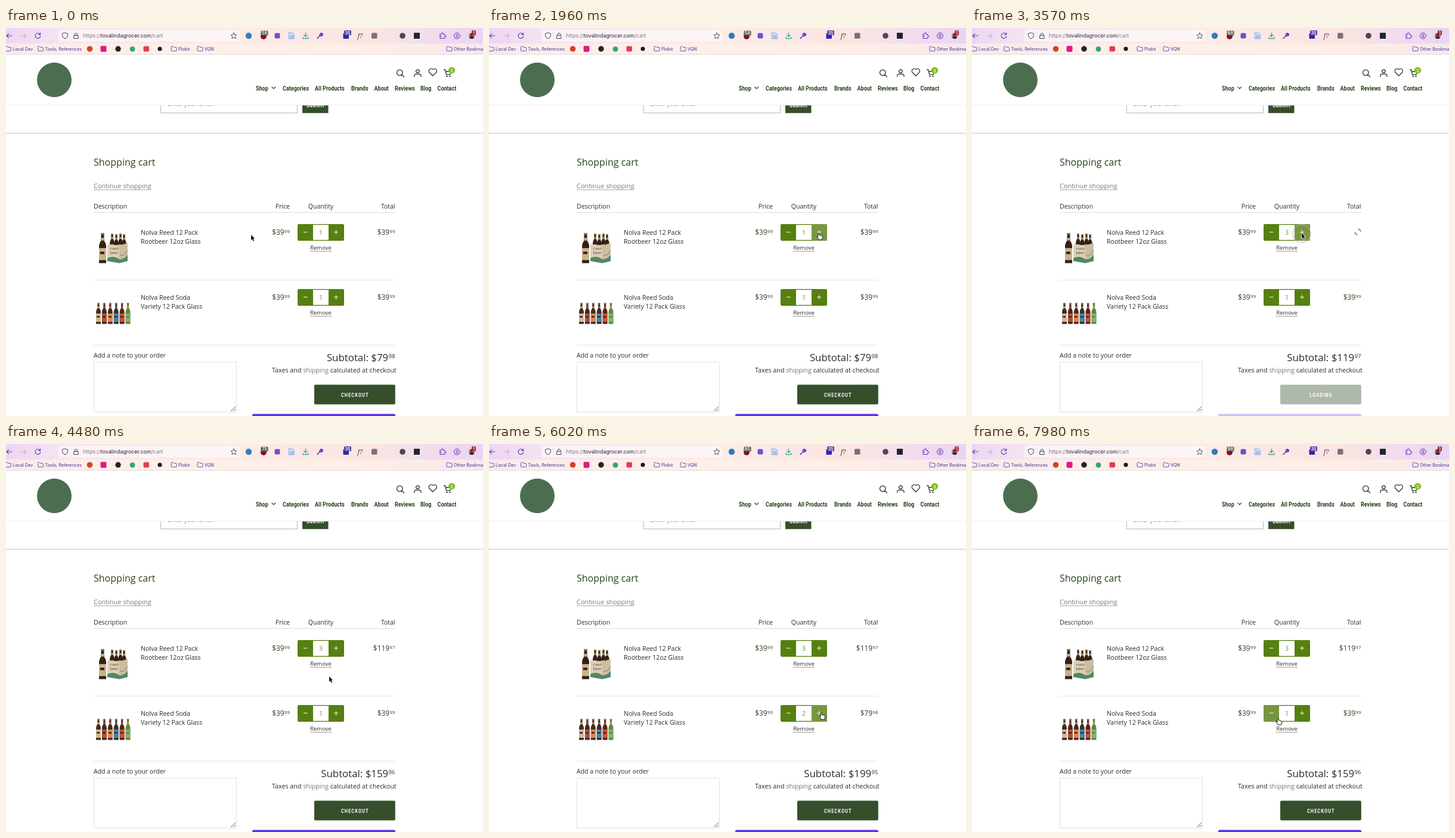
An HTML page with a canvas that plays this animation: 800x651 px, repeating every 8000 ms.

```html
<!DOCTYPE html>
<html lang="en">
<head>
<meta charset="utf-8">
<title>Shopping cart</title>
<style>
html, body { margin: 0; width: 100%; height: 100%; overflow: hidden; background: #fff; }
canvas { display: block; width: 100%; height: 100%; }
</style>
</head>
<body>
<canvas id="stage" width="800" height="651"></canvas>
<script>
const ctx = document.getElementById('stage').getContext('2d');
const LOOP = 8000, STEP = 70, UNIT_PRICE = 3999;
const SANS = '"Open Sans", sans-serif', UI = 'Inter, sans-serif', NARROW = 'Roboto, sans-serif';
const INK = '#2b2b2b', DARK = '#27431f', BUTTON = '#354f2c', GREEN = '#568010', HOVER = '#77973f';
const PURPLE = '#5b35c4';

// row, change in quantity, press, totals refreshed, checkout ready again
const clicks = [
  { row: 0, add: 1, start: 2030, shown: 2730, done: 2940 },
  { row: 0, add: 1, start: 3290, shown: 3990, done: 4200 },
  { row: 1, add: 1, start: 5110, shown: 5740, done: 5950 },
  { row: 1, add: -1, start: 7070, shown: 7630, done: 7770 }
];
const pointerKeys = [
  [0, 411, 347], [280, 411, 347], [1190, 548, 343], [1470, 548, 343], [2030, 553, 344],
  [4130, 553, 344], [4480, 542, 390], [4900, 557, 451], [6160, 557, 451],
  [6930, 502, 455], [7280, 502, 455], [7910, 513, 460], [8000, 513, 460]
];
const badgeKeys = [
  [0, 58], [2100, 58], [2870, 62], [3150, 66], [3360, 66], [4270, 75],
  [5110, 75], [5950, 85], [7070, 85], [7210, 90], [7840, 98], [8000, 98]
];

function track(keys, t, ease) {
  const i = Math.max(1, keys.findIndex(k => k[0] > t));
  const a = keys[i - 1], b = keys[i];
  const p = ease((t - a[0]) / (b[0] - a[0]));
  return a.slice(1).map((v, n) => v + (b[n + 1] - v) * p);
}
const linear = p => p;
const smooth = p => p * p * (3 - 2 * p);

function rect(x, y, w, h, fill, r = 0) {
  ctx.fillStyle = fill;
  ctx.beginPath();
  ctx.roundRect(x, y, w, h, r);
  ctx.fill();
}
function circle(x, y, r, fill) {
  ctx.fillStyle = fill;
  ctx.beginPath();
  ctx.arc(x, y, r, 0, Math.PI * 2);
  ctx.fill();
}
function line(x1, y1, x2, y2, color, width = 1, dash = []) {
  ctx.strokeStyle = color;
  ctx.lineWidth = width;
  ctx.setLineDash(dash);
  ctx.beginPath();
  ctx.moveTo(x1, y1);
  ctx.lineTo(x2, y2);
  ctx.stroke();
  ctx.setLineDash([]);
}
function icon(d, x, y, stroke, width = 1, fill) {
  const path = new Path2D(d);
  ctx.save();
  ctx.translate(x, y);
  ctx.lineJoin = ctx.lineCap = 'round';
  if (fill) { ctx.fillStyle = fill; ctx.fill(path); }
  if (stroke) { ctx.strokeStyle = stroke; ctx.lineWidth = width; ctx.stroke(path); }
  ctx.restore();
}
function text(s, x, y, size, color = INK, align = 'left', family = SANS, style = '400') {
  ctx.font = `${style} ${size}px ${family}`;
  ctx.fillStyle = color;
  ctx.textAlign = align;
  ctx.fillText(s, x, y);
  return ctx.measureText(s).width;
}
// condensed face for navigation and buttons
function narrow(s, x, y, size, color, align = 'left', spacing = 0) {
  ctx.save();
  ctx.translate(x, y);
  ctx.scale(0.82, 1);
  ctx.letterSpacing = spacing + 'px';
  text(s, 0, 0, size, color, align, NARROW, '700');
  ctx.restore();
}
function money(cents, right, y, size, small, color, prefix = '') {
  const w = text(String(cents % 100).padStart(2, '0'), right, y - size * 0.28, small, color, 'right');
  text(prefix + '$' + Math.floor(cents / 100), right - w - 0.3, y, size, color, 'right');
}

function folder(x, label) {
  icon('M0 1.2Q0 0 1 0H3.3L4.6 1.4H8Q9 1.4 9 2.4V6.6Q9 7.6 8 7.6H1Q0 7.6 0 6.6Z', x, 31, PURPLE, 0.9);
  text(label, x + 12, 38, 7.3, '#46309c', 'left', UI);
}
function countBadge(x, y, label, color) {
  rect(x - 6, y - 4, 12, 8, color, 1.5);
  text(label, x, y + 2.8, 7.4, '#fff', 'center', UI, '600');
}

function browserBar(count) {
  const g = ctx.createLinearGradient(0, 0, 800, 0);
  [[0, '#ecd6f3'], [0.12, '#f6e4ef'], [0.5, '#fcebe6'], [0.78, '#fbe4e3'], [1, '#e9d4f5']]
    .forEach(([p, c]) => g.addColorStop(p, c));
  rect(0, 0, 800, 45, g);
  rect(0, 26, 800, 19, 'rgba(255,243,232,.65)');
  rect(88, 3, 304, 20, 'rgba(255,255,255,.5)', 3);
  line(0, 44.5, 800, 44.5, '#e9dcdc');

  icon('M9 4H0M3.6 .4L0 4L3.6 7.6', 1, 9, '#5a38b4', 1.1);
  icon('M0 4H9M5.4 .4L9 4L5.4 7.6', 25, 9, '#c3abd6', 1.1);
  icon('M8 1.8A4.4 4.4 0 1 0 8.8 5.4M8.6 -.4V2.6H5.6', 49, 8.5, '#5a38b4', 1.1);
  icon('M4.5 0L9 1.6V4.6Q8.6 8.4 4.5 10Q.4 8.4 0 4.6V1.6Z', 94.5, 8, '#444', 1);
  icon('M0 4H7V9H0ZM1.4 4V2.2A2.1 2.1 0 0 1 5.6 2.2V4', 114, 8.5, '#444', 1);
  let x = 129;
  [['https://', '#81777f'], ['tovalindagrocer.com', '#29252b'], ['/cart', '#81777f']]
    .forEach(([s, c]) => { x += text(s, x, 16.3, 8.8, c, 'left', UI); });
  icon('M5 0L6.5 3.3L10 3.7L7.4 6.1L8.1 9.6L5 7.8L1.9 9.6L2.6 6.1L0 3.7L3.5 3.3Z', 377, 8, '#444', 0.9);

  circle(407, 13, 5.2, '#2f7cc4');
  circle(432, 14, 5, '#7d1420');
  countBadge(433.5, 8.5, count, '#555');
  rect(450.5, 8.5, 9, 9, '#6853cf', 2);
  icon('M0 0H6L9 3V10H0ZM2 4.5H7M2 6.5H7M2 8.3H7', 474.5, 8, '#6ba0dd', 0.9, '#cfe3f8');
  icon('M4.5 0V6.4M1.6 3.7L4.5 6.6L7.4 3.7M0 7.4V9.6H9V7.4', 498, 8, '#27a28c', 1.2);
  icon('M0 9L5 4M4.6 4.4A2.8 2.8 0 0 1 8 .5L6.5 2.2L7.5 3.2L9.2 1.8A2.8 2.8 0 0 1 5.2 4.6', 522, 8.5, '#4b38cf', 1.7);
  rect(565.5, 9, 9.5, 9, '#3b20ad', 1);
  countBadge(573, 8, '35', '#4f3fa5');
  text('f?', 594, 16.5, 10.5, '#444', 'center', '"Noto Serif", serif', 'italic 400');
  rect(613, 8.2, 9.5, 9.5, '#77727a', 1.5);
  circle(665, 13, 4.8, '#4b474c');
  rect(684, 8, 10, 10, '#1d2733');
  icon('M0 3H2.6Q1.8 0 3.8 0Q5.8 0 5 3H7.6V5.4Q10 4.7 10 6.5Q10 8.2 7.6 7.5V10H0V7.3Q2.2 7.6 2.2 6.5Q2.2 5.2 0 5.7Z', 728, 7.5, PURPLE, 1);
  icon('M10 5A5 5 0 1 1 0 5A5 5 0 1 1 10 5M6.7 4A1.7 1.7 0 1 1 3.3 4A1.7 1.7 0 1 1 6.7 4M2 8.4Q5 5.4 8 8.4', 751.5, 8, PURPLE, 1);
  circle(781, 13, 5.2, '#b48172');
  circle(781, 11.5, 2.2, '#35272b');
  rect(777.5, 14, 7, 4, '#35272b', 2);
  rect(781, 4, 7, 8, '#a3282e', 1.5);
  text('1', 784.5, 10.6, 7, '#fff', 'center', UI, '600');

  folder(-1, 'Local Dev');
  folder(53.5, 'Tools, References');
  circle(140.5, 35, 4.8, '#d8402d');
  rect(158.5, 30, 10, 10, '#e41a86', 2);
  circle(188, 35, 4.7, '#242124');
  circle(212, 35.3, 4.4, '#33a17f');
  rect(230.5, 30.5, 9.5, 9, '#e63c50', 2);
  circle(258, 35, 3.6, '#1d1a1c');
  folder(277, 'Plobit');
  folder(321, 'VQN');
  folder(739, 'Other Bookmarks');
}

function siteHeader() {
  rect(0, 45, 800, 84, '#fff');
  line(0, 129.5, 800, 129.5, '#ececec');
  circle(81, 87, 29, '#4d6d50');

  icon('M9.6 4.9A4.8 4.8 0 1 1 0 4.9A4.8 4.8 0 1 1 9.6 4.9M8.4 8.4L12 12', 655.5, 70, '#26331f', 1.3);
  icon('M8.4 3A2.8 2.8 0 1 1 2.8 3A2.8 2.8 0 1 1 8.4 3M0 12V10.6Q0 7.8 3 7.8H8.2Q11.2 7.8 11.2 10.6V12', 684.8, 69.6, '#26331f', 1.3);
  icon('M7 12.4L1.3 6.7A3.7 3.7 0 0 1 7 1.9A3.7 3.7 0 0 1 12.7 6.7Z', 708.8, 67.8, '#26331f', 1.3);
  icon('M0 0H2.2L4 8.2H10.6L12 3H2.8', 734.5, 70, '#26331f', 1.3);
  circle(739.5, 81, 1.2, '#26331f');
  circle(744.5, 81, 1.2, '#26331f');
  circle(747.5, 71, 5.6, '#84bd2c');
  text('2', 747.5, 73.6, 7.2, '#fff', 'center', SANS, '600');

  [['Shop', 419], ['Categories', 464], ['All Products', 518], ['Brands', 579], ['About', 617.5],
   ['Reviews', 652], ['Blog', 695], ['Contact', 723.5]]
    .forEach(([s, x]) => narrow(s, x, 104.6, 11, DARK));
  icon('M0 0L2.8 2.8L5.6 0', 446, 99, DARK, 1.2);
}

function signup() {
  ctx.strokeStyle = '#b5b5b5';
  ctx.lineWidth = 1;
  ctx.strokeRect(259.5, 110.5, 229, 32);
  text('Enter your email', 271, 131.2, 10, '#888');
  rect(497, 110, 43.5, 32.8, BUTTON);
  narrow('Submit', 519, 132.8, 10, '#fff', 'center', 0.8);
  line(0, 176.5, 800, 176.5, '#c2c2c2');
}

function bottle(x, y, w, h, glass, label, cap) {
  const c = x + w / 2, n = w * 0.19;
  ctx.fillStyle = glass;
  ctx.beginPath();
  ctx.moveTo(c - n, y);
  ctx.lineTo(c + n, y);
  ctx.lineTo(c + n * 1.2, y + h * 0.26);
  ctx.quadraticCurveTo(x + w, y + h * 0.34, x + w, y + h * 0.46);
  ctx.lineTo(x + w, y + h);
  ctx.lineTo(x, y + h);
  ctx.lineTo(x, y + h * 0.46);
  ctx.quadraticCurveTo(x, y + h * 0.34, c - n * 1.2, y + h * 0.26);
  ctx.fill();
  rect(c - n - 0.4, y, n * 2 + 0.8, h * 0.06, cap);
  rect(x, y + h * 0.5, w, h * 0.4, label);
  rect(x + w * 0.15, y + h * 0.62, w * 0.6, h * 0.08, glass);
  rect(c - n, y + h * 0.16, n * 2, h * 0.09, label);
}
function sixPack() {
  bottle(156, 344, 12, 50.5, '#352016', '#c9b28b', '#8a6d45');
  [174, 181, 188, 194].forEach((x, i) =>
    bottle(x, 345 + i % 2, 8, 36, '#352016', '#b7a37e', '#8a6d45'));
  icon('M170 363L190 365L204 361V391L190 394.5L170 391Z', 0, 0, null, 0, '#dccdb6');
  icon('M190 365L204 361V391L190 394.5Z', 0, 0, null, 0, '#cdbd9f');
  icon('M170 386Q181 381 190 388Q197 389 204 381V391L190 394.5L170 391Z', 0, 0, null, 0, '#4f8a68');
  icon('M192 381Q198 384 203 374', 0, 0, '#7faa86', 1.5);
  const mono = '"Liberation Mono", monospace';
  text('root', 182, 371.5, 6.2, '#4a3a2c', 'center', mono);
  text('beer', 182, 378.5, 6.2, '#4a3a2c', 'center', mono);
}
function variety() {
  ['#cdb896', '#b04e40', '#d98a4a', '#3f88b5', '#d05040', '#76b96c']
    .forEach((label, i) => bottle(151 + i * 9.9, 461.5, 8, 35, i < 5 ? '#47291b' : '#71803a', label, '#8a6a48'));
}

function stepper(y, qty, over) {
  rect(489, y, 78, 28, GREEN, 2);
  if (over) rect(over < 0 ? 489 : 541, y, 26, 28, HOVER, 2);
  rect(515, y + 1.3, 26, 25.4, '#fff');
  line(499, y + 13.5, 505.5, y + 13.5, '#e6efd5', 1.2);
  line(550.2, y + 13.5, 557, y + 13.5, '#e6efd5', 1.2);
  line(553.6, y + 10.1, 553.6, y + 16.9, '#e6efd5', 1.2);
  text(qty, 528, y + 18, 10.5, '#6b9137', 'center');
}
function spinner(x, y, t) {
  const turn = (t - 7210) / 1000 * Math.PI * 2 + 0.1;
  ctx.strokeStyle = '#4f8040';
  ctx.lineWidth = 1.4;
  [0, Math.PI].forEach(a => {
    ctx.beginPath();
    ctx.arc(x, y, 4.8, turn + a - 0.7, turn + a + 0.7);
    ctx.stroke();
  });
}
function cartRow(i, names, qty, paid, busy, over, t) {
  const y = 329 + i * 109;
  names.forEach((s, n) => text(s, 226, y + 18 + n * 15, 10.55));
  money(UNIT_PRICE, 476, y + 18.3, 11.9, 8, DARK);
  stepper(y, qty, over);
  text('Remove', 528, y + 42.7, 9.5, INK, 'center');
  line(510, y + 45.5, 546, y + 45.5, '#999');
  if (busy) spinner(647, y + 13, t);
  else money(UNIT_PRICE * paid, 652.5, y + 18.3, 11.9, 8, DARK);
  line(147, y + 94, 653, y + 94, '#c8c8c8', 1, [1, 1]);
}

function summary(units, loading) {
  text('Add a note to your order', 147, 553, 10.5);
  ctx.strokeStyle = '#c2c2c2';
  ctx.lineWidth = 1;
  ctx.setLineDash([1, 1]);
  ctx.strokeRect(147.5, 560.5, 239, 84);
  ctx.setLineDash([]);
  line(377, 643, 385, 635, '#666');
  line(381, 643, 385, 639, '#666');

  money(UNIT_PRICE * units, 652.5, 559, 16.85, 9.6, INK, 'Subtotal: ');
  let x = 446;
  [['Taxes and ', INK], ['shipping', '#777'], [' calculated at checkout', INK]]
    .forEach(([s, c]) => { x += text(s, x, 578.3, 10.72, c); });
  rect(517, 598.5, 135.8, 33, loading ? '#aeb9ab' : BUTTON, 2);
  narrow(loading ? 'LOADING' : 'CHECKOUT', 585.3, 618.8, 9, '#fff', 'center', 1.3);
  rect(413, 647.5, 240, 12, loading ? '#cdc1fb' : '#5a31f4', 2.5);
}

function clickRing(x, y, age) {
  ctx.globalAlpha = age < 210 ? 1 : 1 - (age - 210) / 140;
  ctx.strokeStyle = '#c9a8cf';
  ctx.lineWidth = 2;
  ctx.beginPath();
  ctx.arc(x, y, 15, 0, Math.PI * 2);
  ctx.stroke();
  ctx.globalAlpha = 1;
}
function pointer(x, y, hand) {
  if (hand) {
    icon('M-1.1 .9C-1.1 -.4 1 -.4 1 .9V3.6C2 3 3 3.4 3 4.2C3.9 3.6 4.9 4 4.9 4.8C5.8 4.4 6.6 4.8 6.6 5.8V8C6.6 9.4 5.6 10 5.6 11.2H.2C0 9.8 -1.6 8.6 -3 6.6C-3.4 5.6 -2.2 5.2 -1.1 6.4Z',
      x, y, '#111', 1, '#fff');
  } else {
    const d = 'M0 0V9L2 7.2L3.6 10.8L5.1 10.1L3.5 6.6L6.2 6.4Z';
    icon(d, x, y, '#fff', 1.6);
    icon(d, x, y, null, 0, '#111');
  }
}

function draw(t) {
  const qty = [1, 1], paid = [1, 1];
  let active = null;
  for (const c of clicks) {
    if (t >= c.start) qty[c.row] += c.add;
    if (t >= c.shown) paid[c.row] += c.add;
    if (t >= c.start && t < c.done) active = c;
  }
  const locked = active && t < active.shown;
  const [px, py] = track(pointerKeys, t, smooth);
  const over = [0, 1].map(i => {
    const top = 329 + i * 109;
    if (py < top || py > top + 28) return 0;
    return px >= 489 && px < 515 ? -1 : px >= 541 && px <= 567 ? 1 : 0;
  });

  rect(0, 0, 800, 651, '#fff');
  signup();
  siteHeader();
  browserBar(Math.floor(track(badgeKeys, t, linear)[0]));

  text('Shopping cart', 147, 230.7, 16, DARK);
  text('Continue shopping', 147, 268.7, 10.95, '#777');
  line(147, 271.5, 240, 271.5, '#b5a3aa');
  text('Description', 147, 302.8, 10.5);
  text('Price', 476, 302.8, 10.5, INK, 'right');
  text('Quantity', 528, 302.8, 10.5, INK, 'center');
  text('Total', 652.5, 302.8, 10.5, INK, 'right');
  line(147, 309.5, 653, 309.5, '#dedede');

  sixPack();
  variety();
  [['Nolva Reed 12 Pack', 'Rootbeer 12oz Glass'], ['Nolva Reed Soda', 'Variety 12 Pack Glass']]
    .forEach((names, i) => cartRow(i, names, qty[i], paid[i], locked && active.row === i, over[i], t));
  summary(paid[0] + paid[1], !!active);

  const pressed = clicks.find(c => t >= c.start && t < c.start + 350);
  if (pressed) clickRing(px, py + 1, t - pressed.start);
  pointer(px, py, !locked && (over[0] || over[1]));
}

function frame() {
  const t = performance.now() % LOOP;
  draw(Math.floor(t / STEP) * STEP);
  requestAnimationFrame(frame);
}
frame();
</script>
</body>
</html>
```
